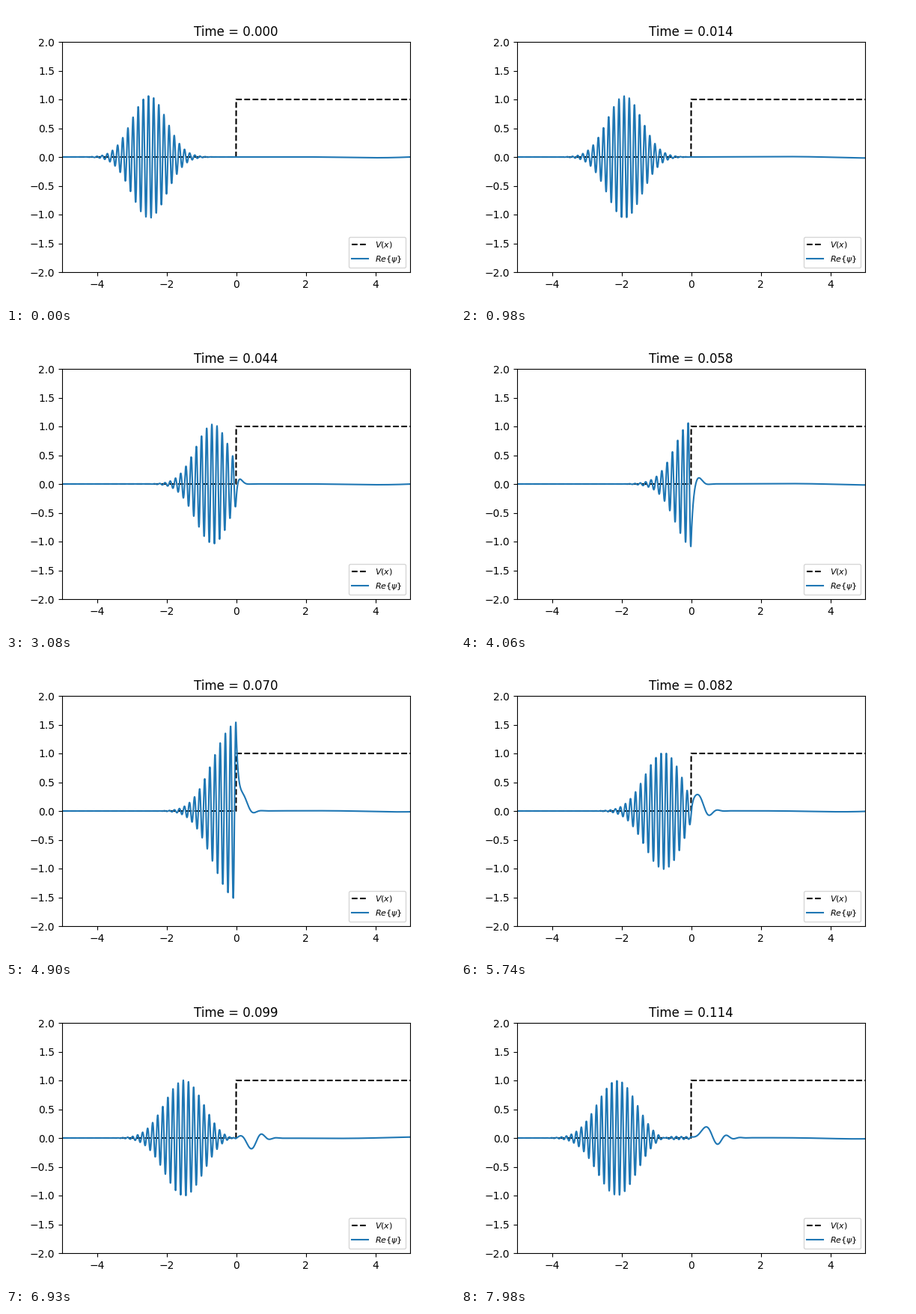
Recreate the animation shown at these times as a matplotlib script. Size 600x400 px, loop 8 s.

```python
import numpy as np
import matplotlib.pyplot as plt
from matplotlib.animation import FuncAnimation

LOOP_MS, TICK_MS, STEP_MS = 8000, 20, 70
DT = 0.001           # simulated time per step
STEPS = 115

# Gaussian packet of energy E hitting a potential step V0 (hbar = m = 1)
E, V0 = 900.0, 1000.0
SIGMA, X0 = 0.5, -2.5
K0 = np.sqrt(2 * E)

x = np.linspace(-5, 5, 2000)
h = x[1] - x[0]
V = np.where(x > 0, 1.0, 0.0)


def evolve():
    """Re(psi) on the grid for every step, as a sum of scattering states."""
    k = np.linspace(K0 - 14, K0 + 14, 561)
    dk = k[1] - k[0]

    # lattice dispersion on both sides of the step
    s2 = np.sin(k * h / 2) ** 2
    q = 2 / h * np.arcsin(np.sqrt(s2 - V0 * h**2 / 2 + 0j))
    energy = 2 * s2 / h**2

    # reflected and transmitted amplitudes
    ratio = np.tan(q * h / 2) / np.tan(k * h / 2)
    r = (1 - ratio) / (1 + ratio)
    t = (1 + r) * np.cos(k * h / 2) / np.cos(q * h / 2)

    left, right = x[x < 0, None], x[x > 0, None]
    states = np.vstack([
        np.exp(1j * k * left) + r * np.exp(-1j * k * left),
        t * np.exp(1j * q * right),
    ])

    amp = (SIGMA**2 * np.pi) ** -0.25 * SIGMA / np.sqrt(2 * np.pi) * dk
    u = k - K0
    weight = amp * np.exp(-(u * SIGMA) ** 2 / 2 - 1j * u * X0)
    times = np.arange(STEPS) * DT
    return (states @ (weight[:, None] * np.exp(-1j * np.outer(energy, times)))).real


psi = evolve()

fig, ax = plt.subplots(figsize=(6, 4), dpi=100)
ax.plot(x, V, "k--", label=r"$V(x)$")
wave, = ax.plot(x, psi[:, 0], color="C0", label=r"$Re\{\psi\}$")
title = ax.set_title("Time = 0.000")
ax.set_xlim(-5, 5)
ax.set_ylim(-2, 2)
ax.legend(loc="lower right", fontsize=8)


def update(i):
    n = min((i * TICK_MS + TICK_MS // 2) // STEP_MS, STEPS - 1)
    wave.set_ydata(psi[:, n])
    title.set_text(f"Time = {n * DT:.3f}")
    return wave, title


anim = FuncAnimation(fig, update, frames=LOOP_MS // TICK_MS, interval=TICK_MS,
                     repeat=True, repeat_delay=0, blit=False)
plt.show()
```
